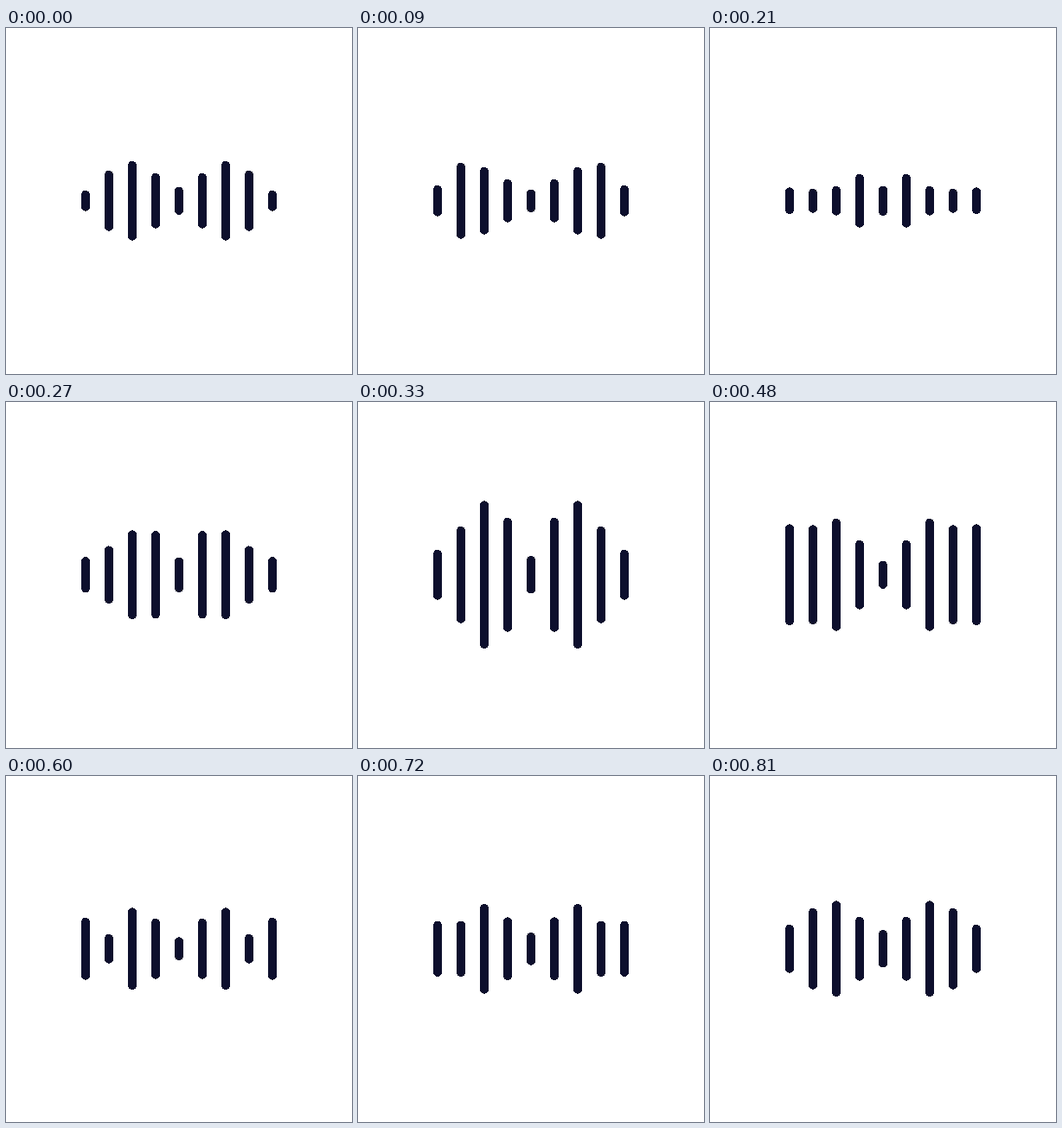
Recreate the animation shown at these times as an HTML page. Size 400 by 400 pixels, loop 840 ms.

```html
<!DOCTYPE html>
<html lang="en">
<head>
<meta charset="utf-8">
<title>Sound wave</title>
<style>
html, body { margin: 0; width: 100%; height: 100%; overflow: hidden; background: #fff; }
svg { display: block; width: 100vw; height: 100vh; }
</style>
</head>
<body>
<svg viewBox="0 0 400 400" fill="#0d0f2d" shape-rendering="crispEdges"></svg>
<script>
const LOOP = 840, STEP = 30, MID = 199.75, GAP = 27, W = 10;

// Key poses: time, then half heights of the four outer pairs, outside in.
const poses = [
  [0, 12, 35, 46, 32],
  [90, 18, 44, 39, 25],
  [210, 15.5, 14, 17, 31],
  [330, 29, 56, 85.5, 66],
  [480, 58.5, 57.5, 65, 40],
  [600, 36, 17, 47.5, 35],
  [810, 28, 47, 55.5, 37]
];

// Pose i, wrapping around the loop in both directions.
function pose(i) {
  const n = poses.length, lap = Math.floor(i / n);
  const [t, ...h] = poses[i - lap * n];
  return { t: t + lap * LOOP, h };
}

// Smooth path through the poses, for one pair of bars.
function pairHeight(k, t) {
  const i = poses.findLastIndex(p => p[0] <= t);
  const [a, b, c, e] = [-1, 0, 1, 2].map(j => pose(i + j));
  const d = c.t - b.t, u = (t - b.t) / d, v = 1 - u;
  const slope = (p, q) => (q.h[k] - p.h[k]) / (q.t - p.t);
  return b.h[k] * v * v * (1 + 2 * u) + c.h[k] * u * u * (1 + 2 * v)
    + d * u * v * (slope(a, c) * v - slope(b, e) * u);
}

const middleHeight = t => 17.5 - 4.25 * Math.cos(2 * Math.PI * (t - 95) / 480);

const svg = document.querySelector('svg');
const bars = Array.from({ length: 9 }, (_, i) => {
  const bar = document.createElementNS('http://www.w3.org/2000/svg', 'rect');
  bar.setAttribute('x', 200 + (i - 4) * GAP - W / 2);
  bar.setAttribute('width', W);
  bar.setAttribute('rx', W / 2);
  return svg.appendChild(bar);
});

function draw(time) {
  const t = Math.floor((time % LOOP) / STEP) * STEP;
  bars.forEach((bar, i) => {
    const h = i === 4 ? middleHeight(t) : pairHeight(Math.min(i, 8 - i), t);
    bar.setAttribute('y', MID - h);
    bar.setAttribute('height', 2 * h);
  });
}

const start = performance.now();
function tick() {
  draw(performance.now() - start);
  requestAnimationFrame(tick);
}
tick();
</script>
</body>
</html>
```
